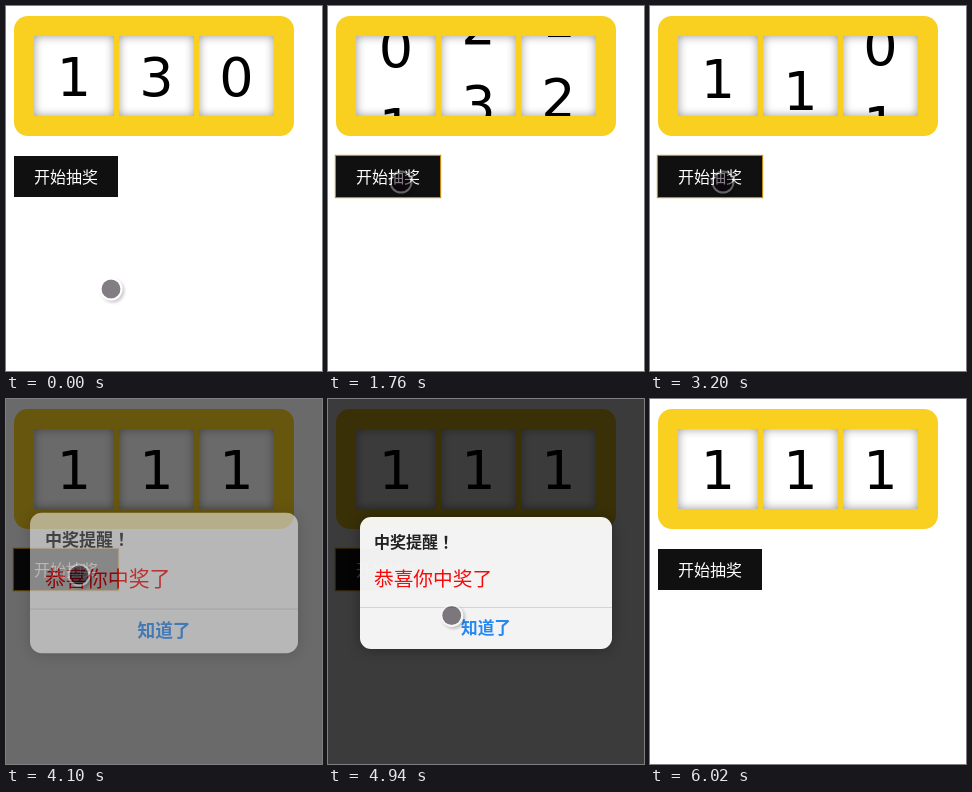
An HTML page that plays this animation: 316 px wide and 365 px high, repeating every 6480 ms.

```html
<!DOCTYPE html>
<html lang="zh-CN">
<head>
<meta charset="utf-8">
<title>开始抽奖</title>
<style>
  html, body { margin: 0; width: 100%; height: 100%; overflow: hidden; background: #fff; }
  body { position: relative; font-family: "Noto Sans CJK SC", "Noto Sans CJK", sans-serif; }
  body * { box-sizing: border-box; }
  .machine, .start, .mask, .dialog, .cursor { position: absolute; }
  .machine {
    left: 8px; top: 10px; width: 280px; height: 120px; padding: 20px;
    display: flex; gap: 5px; border-radius: 14px; background: #f9cf20;
  }
  .reel { position: relative; flex: none; width: 75px; height: 80px; overflow: hidden; background: #fff; }
  .reel:first-child { width: 80px; }
  .reel::after { content: ""; position: absolute; inset: 0; box-shadow: inset 0 0 10px rgba(0, 0, 0, .4); }
  .strip {
    position: absolute; top: 2px; width: 100%; text-align: center; white-space: pre-line;
    font: 54px/80px "DejaVu Sans", sans-serif; color: #000;
  }
  .start {
    left: 8px; top: 150px; width: 104px; height: 41px;
    font-size: 16px; line-height: 41px; text-align: center; color: #fff; background: #101010;
  }
  .start.focused { box-shadow: 0 0 1px 1px #c48a18; }
  .mask { inset: 0; background: #000; }
  .dialog {
    left: 32px; top: 118px; width: 252px; height: 132px;
    border-radius: 11px; background: rgba(255, 255, 255, .94);
    box-shadow: 0 1px 14px rgba(0, 0, 0, .3);
  }
  .dialog div { position: absolute; white-space: nowrap; }
  .title { left: 14px; top: 12px; font-size: 16px; line-height: 24px; font-weight: bold; color: #222; }
  .message { left: 14px; top: 46px; font-size: 19.7px; line-height: 30px; color: #f80808; }
  .confirm {
    left: 0; top: 90px; width: 100%; height: 42px; border-top: 1px solid #d4d4d4;
    font-size: 16.7px; line-height: 39px; font-weight: bold; text-align: center; color: #2488f4;
  }
  .cursor {
    left: -11.5px; top: -11.5px; width: 23px; height: 23px; border-radius: 50%;
    border: 2px solid rgba(255, 255, 255, .35);
    background: rgba(10, 0, 10, .51) padding-box;
    box-shadow: 2px 2px 3px rgba(0, 0, 0, .2);
  }
</style>
</head>
<body>
<div class="machine">
  <div class="reel"><div class="strip"></div></div>
  <div class="reel"><div class="strip"></div></div>
  <div class="reel"><div class="strip"></div></div>
</div>
<div class="start">开始抽奖</div>
<div class="mask"></div>
<div class="dialog">
  <!-- Japanese glyph rules centre the exclamation mark. -->
  <div class="title">中奖提醒<span lang="ja">！</span></div>
  <div class="message">恭喜你中奖了</div>
  <div class="confirm">知道了</div>
</div>
<div class="cursor"></div>
<script>
const LOOP = 6480, ROW = 80;
const REELS = [
  { digit: 1, rows: 30, start: 846, duration: 2440 },
  { digit: 3, rows: 18, start: 960, duration: 2570 },
  { digit: 0, rows: 21, start: 744, duration: 3140 }
];
const CLICK = 680, OPEN = 3940, CONFIRM = 5460, CLOSE = 5715, CLOSED = 6000;

const find = selector => document.querySelector(selector);
const strips = [...document.querySelectorAll(".strip")];
const start = find(".start"), mask = find(".mask"), dialog = find(".dialog"), cursor = find(".cursor");
strips.forEach(strip => strip.textContent = [..."01234567890"].join("\n"));

const progress = (t, from, duration) => Math.min(1, Math.max(0, (t - from) / duration));
const mix = (a, b, k) => a + (b - a) * k;
const smooth = k => k * k * (3 - 2 * k);

// The CSS "ease" curve, cubic-bezier(.25, .1, .25, 1).
function ease(x) {
  if (x <= 0 || x >= 1) return x;
  let low = 0, high = 1, s;
  for (let i = 0; i < 24; i++) {
    s = (low + high) / 2;
    if (.75 * s * (1 - s) + s ** 3 < x) low = s; else high = s;
  }
  return .3 * s * (1 - s) ** 2 + 3 * s * s * (1 - s) + s ** 3;
}

function cursorAt(t) {
  if (t >= CONFIRM) return [141.5, 232.5];
  if (t >= 4600) {
    const k = smooth(progress(t, 4600, 530));
    return [mix(72.5, 144, k), mix(175.5, 232.5, k)];
  }
  const k = smooth(progress(t, 20, 460));
  return [mix(104.5, 72.5, k), mix(282.5, 175.5, k)];
}

function draw(t) {
  REELS.forEach(({ digit, rows, start, duration }, i) => {
    const row = (digit + rows * ease(progress(t, start, duration))) % 10;
    strips[i].style.transform = `translateY(${-row * ROW}px)`;
  });
  start.classList.toggle("focused", t >= CLICK && t < CONFIRM);

  const remaining = 1 - ease(progress(t, CLOSE, CLOSED - CLOSE));
  mask.style.opacity = .77 * ease(progress(t, OPEN, 350)) * remaining;
  dialog.style.opacity = ease(progress(t, OPEN + 40, 380)) * remaining;
  dialog.style.transform = `scale(${mix(1.115, 1, ease(progress(t, OPEN, 600)))})`;

  const [x, y] = cursorAt(t);
  cursor.style.transform = `translate(${x}px, ${y}px)`;
  cursor.style.visibility = t < CLOSED ? "visible" : "hidden";
}

const origin = performance.now();
function tick() {
  draw((performance.now() - origin) % LOOP);
  requestAnimationFrame(tick);
}
tick();
</script>
</body>
</html>
```
